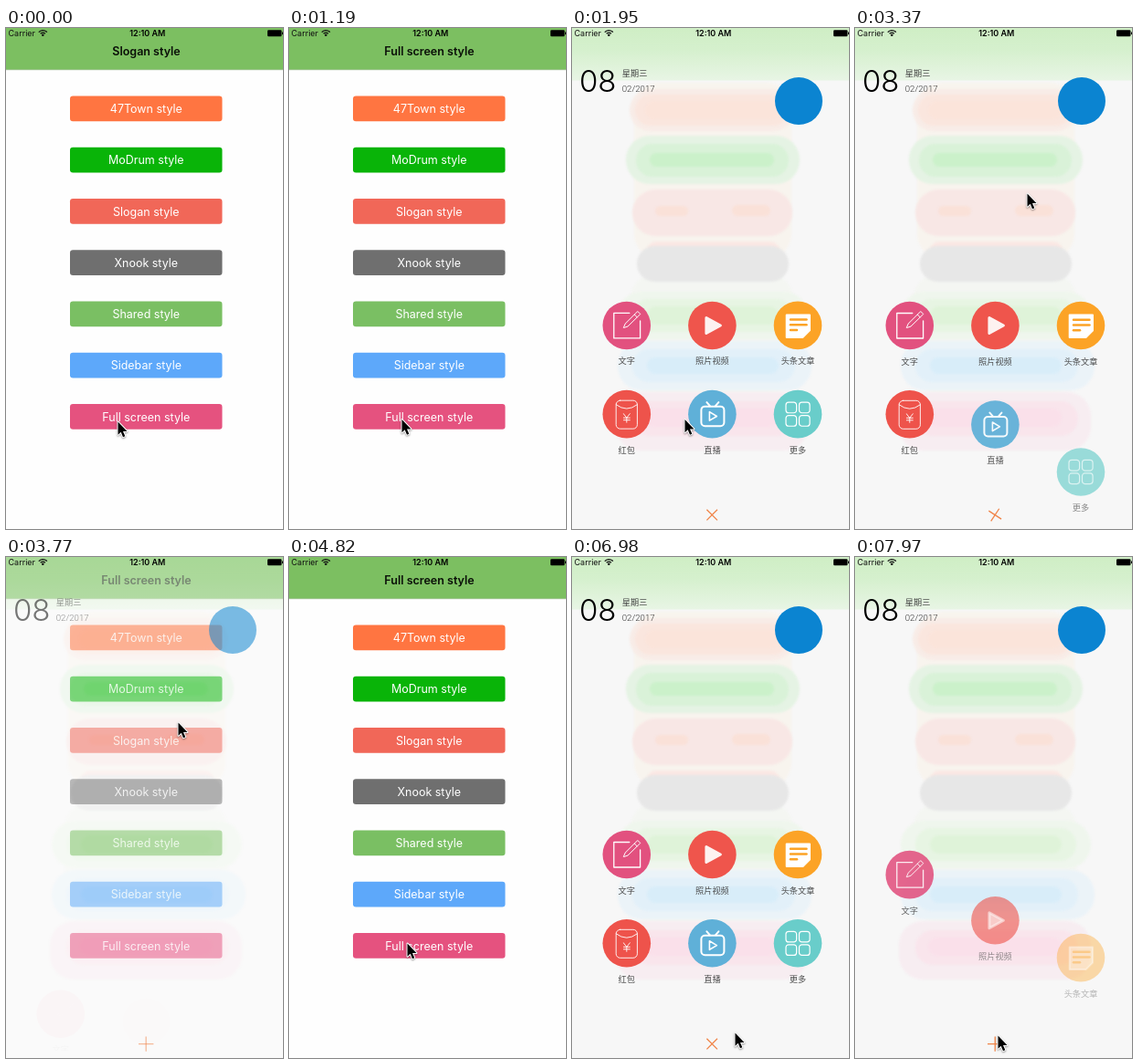
Animation, 303 px wide and 549 px high, one loop 8000 ms. Source, as an HTML page with a canvas:

```html
<!DOCTYPE html>
<html lang="en">
<head>
<meta charset="utf-8">
<title>Popup menu</title>
<style>
html, body { margin: 0; width: 100%; height: 100%; overflow: hidden; background: #fefefe; }
canvas { display: block; width: 100vw; height: 100vh; }
</style>
</head>
<body>
<canvas id="stage"></canvas>
<script>
const W = 303, H = 549, LOOP = 8000;
const canvas = document.getElementById('stage');
const ratio = Math.max(1, window.devicePixelRatio || 1);
canvas.width = W * ratio;
canvas.height = H * ratio;
const ctx = canvas.getContext('2d');

const SANS = 'Inter, "Noto Sans", sans-serif';
const CJK = '"Noto Sans CJK SC", "Noto Sans CJK", sans-serif';

const BUTTONS = [
  ['47Town style', '#ff7541'], ['MoDrum style', '#09b408'], ['Slogan style', '#f16758'],
  ['Xnook style', '#6f6f6f'], ['Shared style', '#7abf63'], ['Sidebar style', '#5da8fa'],
  ['Full screen style', '#e5527f']
];

// Frosted backdrop: colour, x, y, width, height
const HAZE = [
  ['#f8f4ee', 68, 60, 172, 192], ['#f4f6f2', 64, 270, 178, 130],
  ['#f8ece7', 63, 67, 180, 46], ['#fae6de', 69, 73, 168, 34], ['#fbe4da', 80, 80, 146, 20],
  ['#e5f3e4', 59, 118, 190, 53], ['#d9f2d8', 70, 127, 167, 36], ['#cbf1ca', 85, 137, 136, 15],
  ['#f8e7e5', 66, 177, 175, 51], ['#fae1d8', 91, 195, 36, 11], ['#fae1d8', 175, 194, 42, 12],
  ['#fae8e4', 82, 234, 145, 20], ['#e7e7e7', 71, 239, 166, 39],
  ['#eff6ed', 50, 289, 208, 52], ['#e7f5e3', 66, 297, 176, 36], ['#dff3d9', 82, 305, 144, 20],
  ['#ebf3f8', 50, 343, 212, 54], ['#e2f0f9', 66, 352, 178, 36], ['#d8edf9', 82, 361, 144, 18],
  ['#f7edf1', 48, 399, 210, 64], ['#f9e5ec', 66, 409, 178, 38], ['#fae0ea', 80, 417, 146, 20]
];

// time, x, y of the pointer tip
const PATH = [
  [0, 122, 431], [150, 122, 431], [230, 123, 428.5], [2580, 123, 428.5], [2950, 188, 181],
  [3990, 188, 181], [4080, 197, 199], [4560, 134, 442], [4820, 129, 423],
  [6150, 129, 423], [6520, 240, 496], [6980, 178, 521], [7020, 178, 521], [7200, 156, 524]
];

const SHOWS = [{ open: 1352, close: 3270 }, { open: 5402, close: 7677 }];
const DROP = 184;

const clamp = v => Math.max(0, Math.min(1, v));
const smooth = v => { v = clamp(v); return v * v * (3 - 2 * v); };
const easeOut = v => 1 - (1 - clamp(v)) ** 2;

// Remaining distance of a damped spring, 1 at rest start and 0 when settled
function spring(ms) {
  if (ms <= 0) return 1;
  const a = 18.5 * ms / 1000;
  return Math.exp(-0.75 * a) * (Math.cos(a) + 0.75 * Math.sin(a));
}

function box(g, x, y, w, h, r) {
  g.beginPath();
  g.roundRect(x, y, w, h, r);
}

function line(...pts) {
  ctx.beginPath();
  for (let i = 0; i < pts.length; i += 2) ctx.lineTo(pts[i], pts[i + 1]);
}

function strokeLine(...pts) {
  line(...pts);
  ctx.stroke();
}

function disc(x, y, r, color) {
  ctx.fillStyle = color;
  ctx.beginPath();
  ctx.arc(x, y, r, 0, 7);
  ctx.fill();
}

function text(str, x, y, font, color, align = 'center') {
  ctx.font = font;
  ctx.fillStyle = color;
  ctx.textAlign = align;
  ctx.fillText(str, x, y);
}

function makeHaze() {
  const c = document.createElement('canvas');
  c.width = W * ratio;
  c.height = H * ratio;
  const g = c.getContext('2d');
  g.scale(ratio, ratio);
  g.fillStyle = '#f7f7f7';
  g.fillRect(0, 0, W, H);
  const top = g.createLinearGradient(0, 0, 0, 58);
  top.addColorStop(0, '#cfeec5');
  top.addColorStop(0.4, '#d5f0cd');
  top.addColorStop(1, '#e8f5e5');
  g.fillStyle = top;
  g.fillRect(0, 0, W, 57.5);
  g.filter = 'blur(1.2px)';
  for (const [color, x, y, w, h] of HAZE) {
    g.fillStyle = color;
    box(g, x, y, w, h, Math.min(h / 2, 26));
    g.fill();
  }
  return c;
}
const haze = makeHaze();

// Glyphs are drawn around the centre of their disc
const ITEMS = [
  ['文字', '#e2517f', () => {
    ctx.lineWidth = 1.3;
    strokeLine(3, -13.5, -14, -13.5, -14, 14, 14.8, 14, 14.8, -5);
    ctx.lineWidth = 1;
    line(-3.5, 2.5, -1.5, -2, 12, -15.5, 15, -12.5, 1.5, 0.8);
    ctx.closePath();
    ctx.stroke();
    strokeLine(8.5, -12, 11.5, -9);
  }],
  ['照片视频', '#ef554c', () => {
    ctx.fillStyle = ctx.strokeStyle = '#fdf2f0';
    ctx.lineWidth = 3;
    line(-6.5, -8.5, 9, 0, -6.5, 8.5);
    ctx.closePath();
    ctx.fill();
    ctx.stroke();
  }],
  ['头条文章', '#fca326', color => {
    ctx.lineWidth = 2;
    line(-12.3, -11.5, 13, -11.5, 13, 5.5, 5.5, 13, -12.3, 13);
    ctx.closePath();
    ctx.fill();
    ctx.stroke();
    ctx.strokeStyle = color;
    ctx.lineWidth = 2.5;
    for (const [y, end] of [[-6.3, 9.5], [-0.6, 9.5], [5.2, -1]]) strokeLine(-8, y, end, y);
  }],
  ['红包', '#ee534b', () => {
    ctx.lineWidth = 0.9;
    box(ctx, -11.6, -15, 23.2, 31, 4.5);
    ctx.stroke();
    ctx.beginPath();
    ctx.moveTo(-11.6, -10.5);
    ctx.quadraticCurveTo(0, -1.5, 11.6, -10.5);
    ctx.stroke();
    strokeLine(-3.5, -0.5, 0, 4, 3.5, -0.5);
    strokeLine(0, 4, 0, 9);
    for (const y of [4, 6.5]) strokeLine(-3.5, y, 3.5, y);
  }],
  ['直播', '#5fb0d8', () => {
    ctx.lineWidth = 2;
    box(ctx, -12, -8.5, 25, 21.5, 4);
    ctx.stroke();
    strokeLine(-6, -13, -2.5, -9);
    strokeLine(7, -13, 3.5, -9);
    ctx.lineWidth = 1.6;
    line(-3, -2.5, 5, 2.3, -3, 7);
    ctx.closePath();
    ctx.stroke();
  }],
  ['更多', '#69cdca', () => {
    ctx.lineWidth = 1.2;
    for (const x of [-13, 1.5]) for (const y of [-13, 1.5]) {
      box(ctx, x, y, 11.6, 11.6, 3);
      ctx.stroke();
    }
  }]
];

function drawPage(t) {
  ctx.fillStyle = '#fefefe';
  ctx.fillRect(0, 0, W, H);
  ctx.fillStyle = '#7cbf61';
  ctx.fillRect(0, 0, W, 46);
  ctx.fillStyle = '#b4c8ac';
  ctx.fillRect(0, 45.5, W, 0.7);
  text(t < 1190 ? 'Slogan style' : 'Full screen style', 153.5, 30, `600 12.5px ${SANS}`, '#0a0f08');
  BUTTONS.forEach(([label, color], i) => {
    const y = 74.5 + i * 56.25;
    ctx.fillStyle = color;
    box(ctx, 70, y, 166.5, 27.8, 3.2);
    ctx.fill();
    text(label, 153.3, y + 18.5, `400 12.5px ${SANS}`, '#fff');
  });
}

function drawItem(i, show, t) {
  const gone = t < show.close
    ? spring(t - show.open - 20 * i)
    : easeOut((t - show.close - 46 * (6 - i)) / 290);
  const alpha = clamp(1 - gone);
  if (!alpha) return;
  const [label, color, glyph] = ITEMS[i];
  ctx.save();
  ctx.globalAlpha *= alpha;
  ctx.translate(59.8 + (i % 3) * 93.6, (i < 3 ? 326 : 423.3) + DROP * gone);
  disc(0, 0, 26.3, color);
  text(label, 0, 42.5, `400 9.2px ${CJK}`, '#4c4c4c');
  ctx.fillStyle = ctx.strokeStyle = '#fff';
  ctx.lineJoin = ctx.lineCap = 'round';
  glyph(color);
  ctx.restore();
}

function drawItems(show, t) {
  ctx.save();
  ctx.beginPath();
  ctx.rect(33, 260, 241, 281);
  ctx.clip();
  ITEMS.forEach((_, i) => drawItem(i, show, t));
  ctx.restore();
}

function drawOverlay(t) {
  const show = t < SHOWS[1].open ? SHOWS[0] : SHOWS[1];
  const alpha = smooth((t - show.open) / 210) * (1 - smooth((t - show.close - 300) / 420));
  if (!alpha) return;
  ctx.save();
  ctx.globalAlpha = alpha;
  ctx.drawImage(haze, 0, 0, W, H);
  text('08', 28.2, 70, `300 33px ${SANS}`, '#000');
  text('星期三', 54.8, 53.3, `400 9.2px ${CJK}`, '#444', 'left');
  text('02/2017', 54.8, 69.5, '300 9.6px Roboto, sans-serif', '#333', 'left');
  disc(248, 80, 26, '#0b84d1');
  drawItems(show, t);

  const turn = t < show.close
    ? smooth((t - show.open) / 290)
    : 1 - smooth((t - show.close) / 300);
  ctx.translate(153.2, 533.6);
  ctx.rotate(turn * Math.PI / 4);
  ctx.strokeStyle = '#f08448';
  ctx.lineWidth = 1.3;
  strokeLine(-8.2, 0, 8.2, 0);
  strokeLine(0, -8.2, 0, 8.2);
  ctx.restore();
}

function drawStatus() {
  text('Carrier', 2.5, 9.3, `400 9px ${SANS}`, '#111', 'left');
  text('12:10 AM', 154.8, 9.3, `600 9px ${SANS}`, '#000');
  ctx.strokeStyle = '#111';
  ctx.lineWidth = 1.3;
  for (const r of [3.5, 6]) {
    ctx.beginPath();
    ctx.arc(40.3, 8.6, r, -Math.PI * 0.77, -Math.PI * 0.23);
    ctx.stroke();
  }
  disc(40.3, 7.8, 1.3, '#111');
  ctx.fillStyle = '#000';
  box(ctx, 286, 2.3, 15.5, 7, 1.2);
  ctx.fill();
  ctx.fillRect(302, 4.5, 1, 2.6);
}

function drawPointer(t) {
  let k = PATH.findIndex(p => p[0] > t);
  if (k < 0) k = PATH.length;
  const a = PATH[k - 1], b = PATH[k] || a;
  const p = a === b ? 0 : smooth((t - a[0]) / (b[0] - a[0]));
  ctx.save();
  ctx.translate(a[1] + (b[1] - a[1]) * p, a[2] + (b[2] - a[2]) * p);
  line(0.5, 0.5, 0.5, 14.8, 3.7, 11.8, 6, 17.2, 8.3, 16.2, 6, 11, 10.5, 11);
  ctx.closePath();
  ctx.lineJoin = 'round';
  ctx.strokeStyle = '#fff';
  ctx.lineWidth = 2;
  ctx.shadowColor = 'rgba(0,0,0,.4)';
  ctx.shadowBlur = 2 * ratio;
  ctx.shadowOffsetY = ratio;
  ctx.stroke();
  ctx.shadowColor = 'transparent';
  ctx.fillStyle = '#000';
  ctx.fill();
  ctx.restore();
}

const start = performance.now();
function frame() {
  const t = (performance.now() - start) % LOOP;
  ctx.setTransform(ratio, 0, 0, ratio, 0, 0);
  drawPage(t);
  drawOverlay(t);
  drawStatus();
  drawPointer(t);
  requestAnimationFrame(frame);
}
frame();
</script>
</body>
</html>
```
